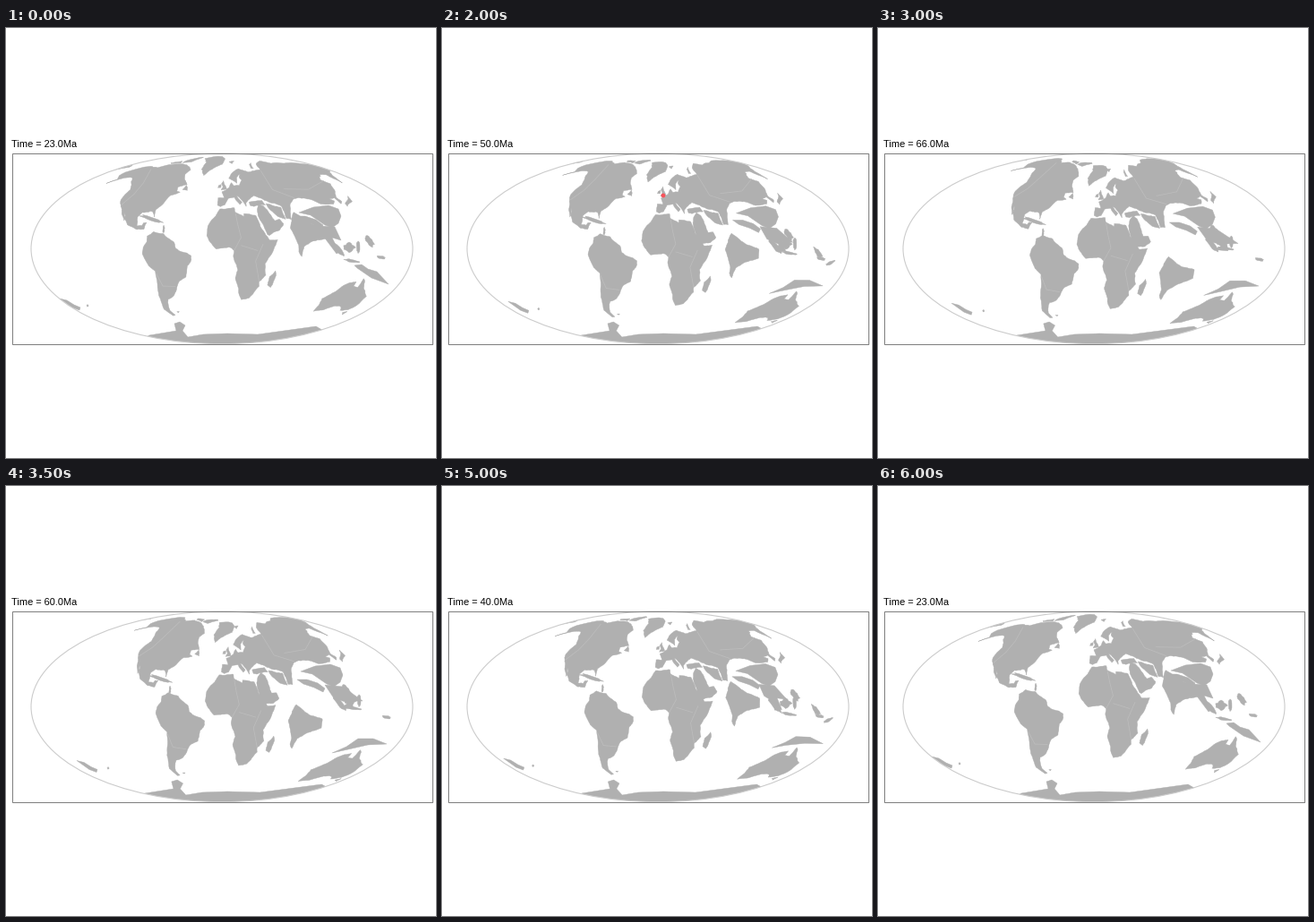
A matplotlib script for the animation above (6.5 s loop, 480 by 480 pixels).

```python
import numpy as np
import matplotlib.pyplot as plt
from matplotlib.animation import FuncAnimation
from matplotlib.collections import LineCollection, PolyCollection
from matplotlib.patches import Circle, Ellipse, Rectangle

CX, CY, RX, RY = 241, 246.3, 213, 106.3
AGES = [23, 30, 40, 45, 50, 60, 66]
AGES += AGES[-2::-1]
LAND, SEAM = "#b0b0b0", "#bcbcbc"
rng = np.random.default_rng(4)

THETA = np.linspace(-np.pi / 2, np.pi / 2, 4001)
LAT = np.arcsin(np.clip((2 * THETA + np.sin(2 * THETA)) / np.pi, -1, 1))


def pairs(flat):
    return np.array(flat, float).reshape(-1, 2)


def sphere(lon, lat):
    return np.stack([np.cos(lat) * np.cos(lon), np.cos(lat) * np.sin(lon), np.sin(lat)], axis=1)


def from_geo(flat):
    return sphere(*np.radians(pairs(flat)).T)


def from_px(flat):
    x, y = pairs(flat).T
    theta = np.arcsin(np.clip((CY - y) / RY, -1, 1))
    lon = (x - CX) / (RX * np.cos(theta)) * np.pi
    return sphere(lon, np.interp(theta, THETA, LAT))


def to_px(vec):
    """Mollweide projection, repeated one turn to either side."""
    lon = np.unwrap(np.arctan2(vec[:, 1], vec[:, 0]))
    theta = np.interp(np.arcsin(np.clip(vec[:, 2], -1, 1)), LAT, THETA)
    return [np.stack([CX + RX * (lon / np.pi + turn) * np.cos(theta),
                      CY - RY * np.sin(theta)], axis=1)
            for turn in (-2, 0, 2)]


def coast(vec, levels=3, rough=0.04):
    """Ragged outline by midpoint displacement."""
    for _ in range(levels):
        nxt = np.roll(vec, -1, axis=0)
        size = np.linalg.norm(nxt - vec, axis=1)[:, None]
        mid = (vec + nxt) / 2
        mid /= np.linalg.norm(mid, axis=1)[:, None]
        mid += rng.normal(size=mid.shape) * size * rough
        mid /= np.linalg.norm(mid, axis=1)[:, None]
        vec = np.stack([vec, mid], axis=1).reshape(-1, 3)
    return vec


def progress(age, pace):
    """Share of the drift done; a positive pace is quick among the young ages."""
    u = (age - 23) / 37
    return u if pace == 0 else np.expm1(-pace * u) / np.expm1(-pace)


class Plate:
    """Rigid block whose anchors move between a young and an old screen position."""

    def __init__(self, anchors, young, old, rings, seams=(), pace=0, load=from_geo):
        self.base = load(anchors)
        self.young, self.old, self.pace = pairs(young), pairs(old), pace
        self.rings = [coast(load(r)) for r in rings]
        self.seams = [load(s) for s in seams]

    def rotation(self, age):
        k = progress(age, self.pace)
        goal = from_px(self.young * (1 - k) + self.old * k)
        u, _, vt = np.linalg.svd(self.base.T @ goal)
        flip = np.diag([1, 1, np.sign(np.linalg.det(vt.T @ u.T))])
        return vt.T @ flip @ u.T

    def place(self, age):
        rot = self.rotation(age).T
        return ([p for r in self.rings for p in to_px(r @ rot)],
                [p for s in self.seams for p in to_px(s @ rot)])


class Block:
    """Small outline on screen that drifts, stretches or turns into another one."""

    def __init__(self, young, old=None, drift=(0, 0), stretch=1, pace=0):
        self.young, self.pace = pairs(young), pace
        goal = self.young if old is None else pairs(old)
        self.old = (goal - (CX, 0)) * (stretch, 1) + (CX, 0) + drift

    def place(self, age):
        k = progress(age, self.pace)
        return [self.young * (1 - k) + self.old * k], []


# Coastlines as lon, lat
AMERICA = [
    -168, 65.5, -157, 71.3, -128, 70.5, -117, 74, -85, 73.7, -68, 70, -62, 66.8, -66, 62.5,
    -64.5, 60.3, -55.7, 52, -66, 50.2, -65, 46.5, -61, 45.5, -70.5, 43, -76, 35.2, -81, 31.5,
    -80.5, 25.5, -84, 30, -94, 29.5, -97.5, 26, -96, 19, -91, 18.8, -90, 21, -87, 21.3,
    -88.5, 16, -95, 16, -105.5, 20, -112.5, 30, -109.8, 23.2, -117, 32.6, -122.5, 37.5,
    -124.3, 40.4, -123, 49, -130.5, 54.7, -140, 60, -151, 60, -164.5, 54.6, -158.5, 58.5,
    -166, 62]
NEWFOUNDLAND = [-59, 47.7, -53, 46.8, -56, 51.5]
ELLESMERE = [-95, 79, -70, 83, -62, 82.3, -78, 76.3, -95, 76]
MELVILLE = [-122, 76, -104, 78, -98, 75.5, -117, 75]
GREENLAND = [-73, 78.2, -60, 82, -35, 83.5, -20, 81, -20, 73.5, -38, 65.8, -43.5, 60,
             -53, 66, -56, 74]
SOUTH_AMERICA = [
    -77.5, 8.5, -72, 12, -62, 10.6, -51.5, 4.3, -50, 0, -44, -2.7, -35.2, -5.5, -35, -8.5,
    -39, -13.5, -41, -22, -48.5, -26, -54, -34.5, -57, -37.5, -65, -41, -67.5, -46, -69, -51,
    -65.5, -54.8, -69, -55.6, -75.5, -50, -73.6, -38, -70.4, -18.4, -76, -14.5, -81.3, -5,
    -80, 0.5, -77.4, 4]
FALKLANDS = [-61, -51.8, -58, -51.4, -59.5, -52.5]
AFRICA = [
    -6, 35.8, 10, 37.3, 10.5, 34, 19.5, 30.4, 20, 32.8, 32.5, 31.2, 37.3, 20, 43.2, 12,
    51.2, 11.9, 46, 2.8, 39, -6, 40.6, -15, 35, -20, 35.5, -24, 31, -30, 27, -33.6,
    20, -34.8, 14.5, -23, 11.8, -17, 13.7, -11, 9, -1, 9.6, 3.9, 4, 6.3, -7.5, 4.4,
    -13, 8.9, -17.2, 14, -17, 21.5, -9.8, 30]
MADAGASCAR = [49.3, -12, 50.4, -15.7, 47.2, -25, 43.6, -23, 44.3, -16.5]
ARABIA = [35, 28.1, 35, 33, 37, 37, 42, 36, 48.2, 29, 51.4, 24.5, 56.3, 26, 59.8, 22.5,
          55, 17.2, 45, 12.8, 43, 13.5, 39, 21.5]
EURASIA_NORTH = [
    -5.6, 36, -9, 37, -8.8, 43.2, -1.8, 43.4, -4.7, 48.4, 4.5, 52.5, 8.3, 57, 11, 54.2,
    19, 54.5, 24, 59.3, 21.4, 62, 25, 65.5, 17.3, 62, 16, 56.5, 11, 59, 5, 61, 15, 68,
    26, 71, 41, 67, 34, 66.5, 46, 67.5, 67, 69, 71, 73, 104, 77.7, 113, 74, 140, 72.5,
    180, 69, 190, 66]
EURASIA_SOUTH = [
    178, 62.5, 163.5, 58, 156.8, 51, 157, 59, 148, 59.3, 136, 55, 140.5, 51, 131, 43,
    127.6, 39.6, 129.4, 36, 126.5, 34.4, 125, 39.5, 118, 39, 122, 37, 118, 34.5,
    105, 35.5, 92, 41, 78, 41, 71, 36.5, 66.5, 25.2, 62, 26, 61, 36, 49, 39.5, 41.5, 43,
    33.5, 45.5, 28.5, 43, 23, 39.5, 22.5, 36.5, 19.3, 41, 13, 45.3, 18.4, 40, 15.7, 38,
    10.3, 44, 3, 43, -1, 37.5]
BRITAIN = [-5.5, 50, 1.4, 51.2, -1.5, 55, -3, 58.5, -5.5, 56, -3.5, 53]
IRELAND = [-10, 52, -6.3, 52.3, -6, 55, -9.5, 54]
SVALBARD = [11, 79, 27, 80, 17, 76.8]
ZEMLYA = [52, 71, 57, 70.8, 68, 76.8, 58, 75]
JAPAN = [131, 32, 140.5, 35.5, 142, 40, 137, 36.8, 131, 34.2]
TURKEY = [26.5, 40, 41.5, 41.2, 44, 37.5, 31, 36.4, 27.3, 37]
IRAN = [45, 38.5, 54, 36, 60, 35, 61, 25.5, 56, 27, 47, 34]
AUSTRALIA = [
    113.7, -23, 115.5, -34.3, 123.5, -34, 131, -31.6, 138, -34, 140, -37.5, 147, -38.8,
    150, -37.3, 153.3, -28, 146, -18.9, 142.6, -10.8, 140.5, -17.5, 136, -15.5,
    136.8, -12.2, 131, -12, 125.5, -14.3, 122.3, -17.8]
TASMANIA = [144.7, -40.8, 148.2, -40.8, 147, -43.5]
# India on screen, at its old position
INDIA = [324, 244, 338, 255, 353, 260, 352, 270, 332, 278, 325, 282, 319, 293, 317, 288,
         318, 276, 315, 262]
INDIA_OLD = [318, 290, 316, 263, 353, 260]

north_america = Plate(
    [-124, 48, -53, 47, -95, 16],
    [136, 180, 203, 181, 147, 228], [160, 175, 221, 188, 154, 226],
    [AMERICA, NEWFOUNDLAND, ELLESMERE, MELVILLE],
    [[-120, 36, -114, 45, -115, 55, -135, 69]])
greenland = Plate([-44, 60, -30, 83], [219, 167, 246, 143], [231, 178, 257, 152], [GREENLAND])
south_america = Plate(
    [-81, -4.5, -35, -7, -68, -55],
    [152, 250, 207, 257, 188, 321], [167, 253, 222, 265, 192, 322],
    [SOUTH_AMERICA, FALKLANDS], [[-70, -20, -66, -30, -53, -30]])
africa = Plate(
    [10, 37, 19, -35, -17, 15, 51, 11],
    [254, 202, 259, 304, 223, 231, 307, 236], [248, 212, 252, 316, 224, 237, 308, 241],
    [AFRICA, MADAGASCAR],
    [[11, 33, 13, 24, 16, 14, 9.5, 4], [16, 8, 32, 4], [37, 9, 30, -4, 35, -20]])
arabia = Plate([35, 29, 59.8, 22.5], [282, 208, 309, 218], [280, 218, 305, 237], [ARABIA],
               pace=1)
eurasia = Plate(
    [0, 51.5, -9.5, 38, 129, 35],
    [243, 182, 235, 197, 381, 199], [249, 189, 241, 206, 370, 193],
    [EURASIA_NORTH + EURASIA_SOUTH, BRITAIN, IRELAND, SVALBARD, ZEMLYA, JAPAN, TURKEY, IRAN],
    [[66, 68, 60, 50, 80, 42], [75, 50, 105, 48, 138, 54]])
india = Plate(INDIA_OLD, [331, 251, 320, 223, 352, 227], INDIA_OLD, [INDIA],
              pace=-1, load=from_px)
australia = Plate(
    [115.7, -32, 142.6, -11, 145, -38.5],
    [348, 313, 398, 282, 379, 314], [329, 327, 396, 294, 372, 326],
    [AUSTRALIA, TASMANIA], pace=3.5)

antarctica = Block(
    [130, 362, 160, 343, 190, 338, 188, 330, 194, 328, 200, 332, 197, 338, 203, 345,
     220, 342, 247, 341, 281, 342, 346, 333, 358, 340, 340, 362], stretch=1.06, pace=3.5)
new_zealand = Block([60, 302, 68, 304, 76, 309, 83, 312, 82, 315, 74, 312],
                    drift=(19, 4.5))
china = Block([343, 200, 360, 198, 371, 202, 374, 210, 371, 218, 364, 223, 356, 220,
               340, 209, 327, 206], drift=(2, 1))
tibet = Block([323, 210, 334, 210, 346, 214, 354, 220, 352, 224, 342, 219, 330, 215],
              drift=(2, 6))
indochina = Block(
    [352, 221, 367, 222, 374, 237, 364, 234, 372, 250, 369, 252, 360, 240, 354, 232],
    [356, 222, 376, 224, 398, 240, 386, 240, 388, 249, 374, 248, 382, 242, 366, 237])
new_guinea = Block(
    [389, 265, 397, 264, 404, 269, 414, 272, 427, 286, 408, 279, 392, 268],
    [364, 298, 380, 291, 393, 282, 410, 282, 425, 288, 404, 289, 382, 294], pace=3.5)

# Islands: centre, width, height, tilt, drift
ISLANDS = [
    (383, 245, 12, 10, 0, 1, -5), (370, 246, 20, 5, 50, 2, -4), (386, 260, 15, 3, 10, 2, -12),
    (393, 245, 4, 12, 0, 1, -5), (406, 238, 14, 6, 55, -26, -10), (419, 256, 9, 3, 10, 6, 2),
    (162, 213, 24, 3.5, 17, 10, 2), (176, 225, 2, 8, 0, 7, 3), (91, 310, 2, 2, 0, 23, 5)]


def island(x, y, w, h, tilt, dx, dy):
    t = np.linspace(0, 2 * np.pi, 16, endpoint=False)
    size = 1 + rng.uniform(-0.25, 0.25, t.size)
    a, b = w / 2 * np.cos(t) * size, h / 2 * np.sin(t) * size
    c, s = np.cos(np.radians(tilt)), np.sin(np.radians(tilt))
    return Block(np.stack([x + a * c - b * s, y + a * s + b * c], axis=1), drift=(dx, dy))


PARTS = [north_america, greenland, south_america, africa, arabia, eurasia, india, australia,
         antarctica, new_zealand, china, tibet, indochina, new_guinea]
PARTS += [island(*row) for row in ISLANDS]
# Island arcs seen only in the middle ages
ARCS = [island(413, 249, 15, 5, 55, 9, 3), island(427, 260, 10, 3, -25, 9, 3)]


def build(age):
    land, seams = [], []
    for part in PARTS + (ARCS if 40 <= age <= 50 else []):
        rings, lines = part.place(age)
        land += rings
        seams += lines
    return land, seams


fig = plt.figure(figsize=(4.8, 4.8), dpi=100, facecolor="white")
ax = fig.add_axes([0, 0, 1, 1])
ax.set(xlim=(0, 480), ylim=(480, 0))
ax.axis("off")

globe = Ellipse((CX, CY), 2 * RX, 2 * RY, fc="none", ec="#cccccc", lw=0.8, zorder=3)
ax.add_patch(globe)
ax.add_patch(Rectangle((6.5, 139.5), 469, 213, fc="none", ec="#7f7f7f", lw=0.72, zorder=4))
ground = PolyCollection([], facecolors=LAND, edgecolors=LAND, linewidths=0.3, zorder=1)
joints = LineCollection([], colors=SEAM, linewidths=0.6, zorder=2)
for item in (ground, joints):
    ax.add_collection(item, autolim=False)
    item.set_clip_path(globe)
site = ax.add_patch(Circle((247, 187), 2.4, fc="#f8525a", ec="none", zorder=5))
label = ax.text(6.4, 133, "", family="Liberation Sans", fontsize=11 * 0.72, color="black",
                va="baseline")


def draw(i):
    age = AGES[i]
    land, seams = build(age)
    ground.set_verts(land)
    joints.set_segments(seams)
    site.set_visible(age == 50)
    label.set_text(f"Time = {age:.1f}Ma")
    return ground, joints, site, label


anim = FuncAnimation(fig, draw, frames=len(AGES), interval=500, repeat=True, repeat_delay=0)
plt.show()
```
